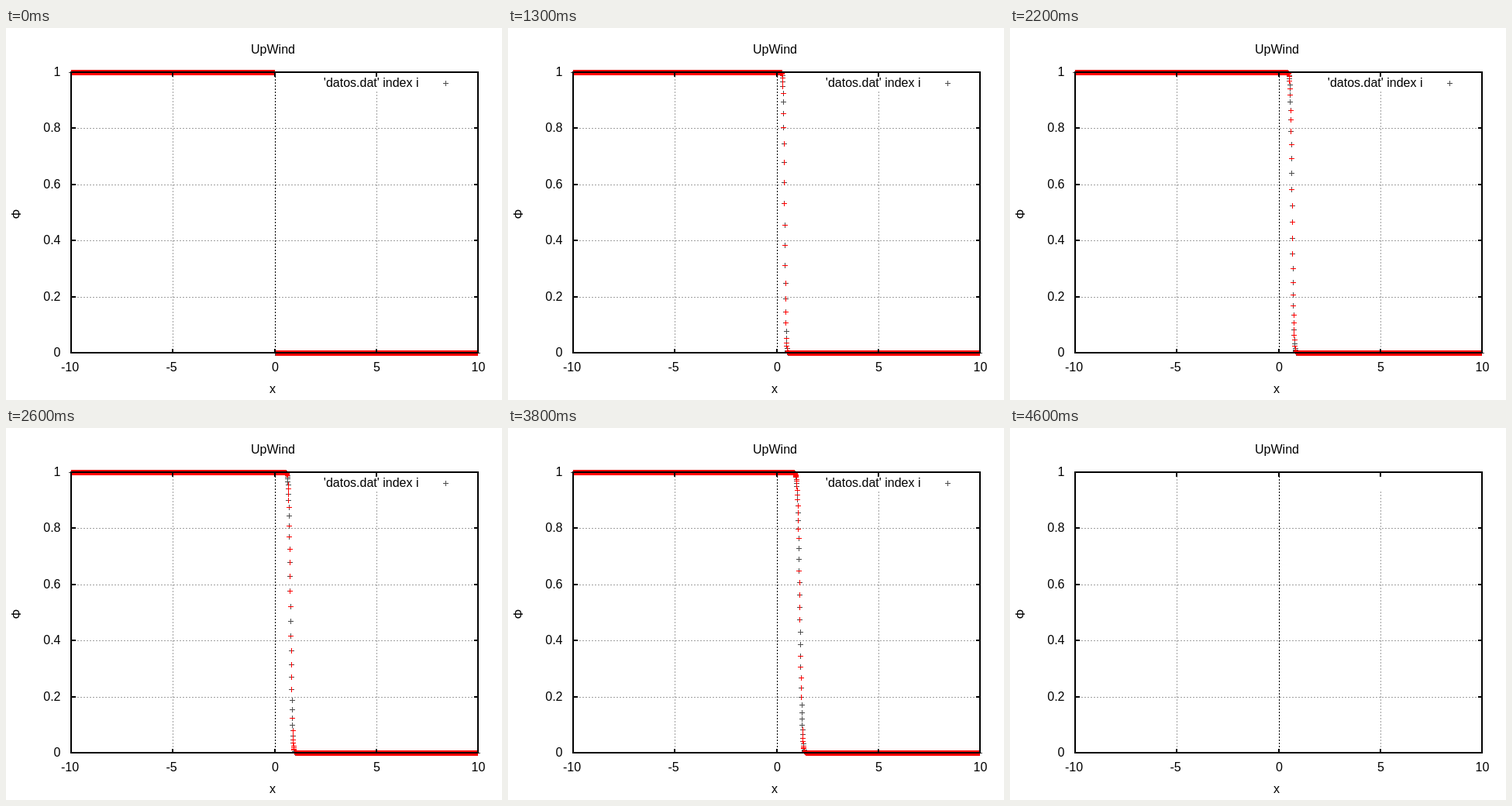
These frames come from a looping animation (640 by 480 pixels, 5100 ms). An HTML page with a canvas:

```html
<!DOCTYPE html>
<html lang="en">
<head>
<meta charset="utf-8">
<title>UpWind</title>
<style>
  html, body { margin: 0; width: 100%; height: 100%; overflow: hidden; background: #fff; }
  canvas, svg { position: absolute; left: 0; top: 0; width: 640px; height: 480px; }
  text { font: 16px "Liberation Sans", Arial, sans-serif; fill: #000; }
</style>
</head>
<body>
<canvas id="plot" width="640" height="480"></canvas>
<svg id="labels" viewBox="0 0 640 480"></svg>
<script>
const WIDTH = 640, HEIGHT = 480;
const LEFT = 84, RIGHT = 609, TOP = 57, BOTTOM = 419;
const STEP_MS = 100, LOOP_MS = 5100, STEPS = 46;
const COURANT = 0.3, SUBSTEPS = 10, CELL = 0.01, LAST_CELL = 998;
const RED = "#ff0000", DARK = "#4c4c4c", GRID = "#a0a0a0";

const ctx = document.getElementById("plot").getContext("2d");
const labels = document.getElementById("labels");
const mask = new Uint8Array(WIDTH * HEIGHT);

const toX = x => Math.round(LEFT + (x + 10) * (RIGHT - LEFT) / 20);
const toY = v => Math.round(BOTTOM - v * (BOTTOM - TOP));

// First-order upwind advection of a unit step; only cells near the front vary.
function solve() {
  let phi = new Float64Array(400);
  const states = [];
  for (let s = 0; s < STEPS; s++) {
    states.push(phi.slice());
    for (let n = 0; n < SUBSTEPS; n++) {
      phi = phi.map((v, i) => v + COURANT * ((i ? phi[i - 1] : 1) - v));
    }
  }
  return states;
}
const states = solve();

function addText(str, x, y, anchor = "middle", transform) {
  const el = document.createElementNS("http://www.w3.org/2000/svg", "text");
  el.textContent = str;
  el.setAttribute("x", x);
  el.setAttribute("y", y);
  el.setAttribute("text-anchor", anchor);
  if (transform) el.setAttribute("transform", transform);
  return labels.appendChild(el);
}

addText("UpWind", 344.5, 33);
addText("x", 344, 471);
addText("Φ", 0, 0, "middle", "translate(19 240) rotate(-90)");
for (let i = 0; i <= 5; i++) addText(String(i / 5), 70.5, toY(i / 5) + 5, "end");
for (let x = -10; x <= 10; x += 5) {
  addText(String(x), toX(x) + (x < 0 ? -1.5 : 0.5), 443);
}
const legend = addText("'datos.dat' index i", 532.5, 76, "end");

function fill(color, x, y, w, h) {
  ctx.fillStyle = color;
  ctx.fillRect(x, y, w, h);
}

function dottedRow(y) {
  for (let x = LEFT; x < RIGHT; x += 4) fill(GRID, x, y, 2, 1);
}

function dottedColumn(x, top, color) {
  for (let y = BOTTOM; y > top; y -= 4) fill(color, x, y - 1, 1, 2);
}

function drawGrid() {
  for (let i = 1; i < 5; i++) dottedRow(toY(i / 5));
  dottedColumn(toX(-5), TOP, GRID);
  dottedColumn(toX(5), 82, GRID);
  dottedColumn(toX(0), TOP, "#000");
}

function drawBorder() {
  const w = RIGHT - LEFT + 2, h = BOTTOM - TOP + 2;
  for (const y of [TOP, BOTTOM]) fill("#000", LEFT - 1, y - 1, w, 2);
  for (const x of [LEFT, RIGHT]) fill("#000", x - 1, TOP - 1, 2, h);
  for (let i = 1; i < 5; i++) {
    const y = toY(i / 5) - 1;
    fill("#000", LEFT, y, 6, 2);
    fill("#000", RIGHT - 5, y, 6, 2);
  }
  for (const v of [-5, 0, 5]) {
    const x = toX(v) - 1;
    fill("#000", x, TOP, 2, 6);
    fill("#000", x, BOTTOM - 5, 2, 6);
  }
}

function plus(x, y) {
  for (let d = -3; d <= 3; d++) {
    mask[y * WIDTH + x + d] = 1;
    mask[(y + d) * WIDTH + x] = 1;
  }
}

function drawPoints(phi) {
  mask.fill(0);
  for (let i = -1000; i <= LAST_CELL; i++) {
    const v = i < 0 ? 1 : i < phi.length ? phi[i] : 0;
    plus(toX(i * CELL), toY(v));
  }
  plus(567, 71);
  // Strokes lying only on odd rows or columns carry no colour.
  for (let y = 0; y < HEIGHT; y++) {
    for (let x = 0; x < WIDTH; x++) {
      if (!mask[y * WIDTH + x]) continue;
      const coloured = mask[(y & ~1) * WIDTH + (x & ~1)];
      fill(coloured ? RED : DARK, x, y, 1, 1);
    }
  }
}

function draw(step) {
  const phi = states[step];
  fill("#fff", 0, 0, WIDTH, HEIGHT);
  drawGrid();
  if (phi) drawPoints(phi);
  drawBorder();
  legend.style.display = phi ? "" : "none";
}

let shown = -1;
const start = performance.now();
function tick() {
  const t = Math.max(0, performance.now() - start) % LOOP_MS;
  const step = Math.min(STEPS, Math.floor(t / STEP_MS));
  if (step !== shown) draw(shown = step);
  requestAnimationFrame(tick);
}
tick();
</script>
</body>
</html>
```
